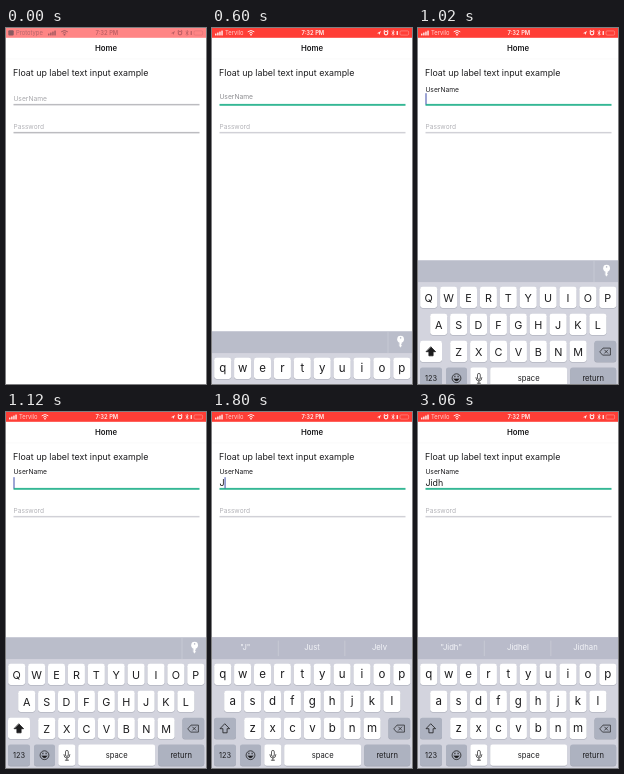
An HTML page that plays this animation: 200x356 px, repeating every 3.16 s.

```html
<!DOCTYPE html>
<html lang="en">
<head>
<meta charset="utf-8">
<title>Float up label</title>
<style>
  html, body { margin: 0; width: 100%; height: 100%; overflow: hidden; background: #fff; }
  svg { display: block; width: 100%; height: 100%; }
  text { font-family: Inter, "Liberation Sans", sans-serif; white-space: pre; }
</style>
</head>
<body>
<svg id="stage" viewBox="0 0 200 356" xmlns="http://www.w3.org/2000/svg"></svg>
<script>
const LOOP = 3160;
const NS = 'http://www.w3.org/2000/svg';
const stage = document.getElementById('stage');

const CUTS = [0, 100, 200, 300, 500, 600, 920, 1020, 1120, 1220, 1310, 1400, 1500,
  1700, 1800, 1970, 2070, 2170, 2290, 2390, 2490, 2760, 2860, 2960, 3060];

function el(tag, attrs, parent = stage) {
  const node = document.createElementNS(NS, tag);
  set(node, attrs);
  parent.appendChild(node);
  return node;
}
function set(node, attrs) {
  for (const k in attrs) node.setAttribute(k, attrs[k]);
}
function text(str, x, y, size, attrs = {}, parent = stage) {
  const node = el('text', { x, y, 'font-size': size, fill: '#1c1c1e', ...attrs }, parent);
  node.textContent = str;
  return node;
}
function rect(x, y, width, height, fill, parent = stage, rx = 0) {
  return el('rect', { x, y, width, height, fill, rx }, parent);
}
function path(d, parent, attrs = {}) {
  return el('path', { d, fill: 'none', stroke: '#1c1c1e', 'stroke-width': 0.8, 'stroke-linecap': 'round',
    'stroke-linejoin': 'round', ...attrs }, parent);
}
const group = (parent = stage) => el('g', {}, parent);
const show = (node, on) => set(node, { visibility: on ? 'inherit' : 'hidden' });
const mid = { 'text-anchor': 'middle' };

// Linear track through [time, value] points.
function track(points, t) {
  let [t0, v0] = points[0];
  for (const [t1, v1] of points) {
    if (t < t1) return v0 + (v1 - v0) * Math.max(0, (t - t0) / (t1 - t0));
    [t0, v0] = [t1, v1];
  }
  return v0;
}
// Value of the last [time, value] entry already reached.
const step = (points, t) => points.filter(p => p[0] <= t).pop()[1];
const mix = (a, b, k) => `rgb(${a.map((v, i) => Math.round(v + (b[i] - v) * k))})`;

// Status bar
const statusBg = rect(0, 0, 200, 9.8, '#ff443c');

function signal(x, parent, fill) {
  for (let i = 0; i < 4; i++) rect(x + i * 2.1, 5.6 - i, 1.5, 1.8 + i, fill, parent, 0.3);
}
function wifi(x, parent, color) {
  for (const r of [1.5, 3]) {
    path(`M${x - r} ${6.6 - r}Q${x} ${5.2 - r * 1.35} ${x + r} ${6.6 - r}`, parent, { stroke: color, 'stroke-width': 1 });
  }
  el('circle', { cx: x, cy: 6.7, r: 0.9, fill: color }, parent);
}

const oldStatus = group();
rect(2.3, 2.2, 5.4, 5.4, '#8a5a60', oldStatus, 1);
text('Prototype', 10, 7.1, 5.8, { fill: '#b5656a' }, oldStatus);
signal(42, oldStatus, '#a55a60');
wifi(58.5, oldStatus, '#a55a60');

const newStatus = group();
signal(3, newStatus, '#ffe4e2');
text('Tervilo', 13, 7.1, 5.8, { fill: '#ffd0cd' }, newStatus);
wifi(39, newStatus, '#ffe4e2');

const clock = text('7:32 PM', 100.8, 7.1, 5.8, { ...mid, 'font-weight': 600 });
const icons = group();
path('M165 5.2L169 3L167.3 7.1L166.9 5.4Z', icons, { fill: 'currentColor', stroke: 'none' });
el('circle', { cx: 174, cy: 5.1, r: 1.8, fill: 'none', stroke: 'currentColor', 'stroke-width': 1.1 }, icons);
path('M171.8 3L172.7 2.3M176.2 3L175.3 2.3', icons, { stroke: 'currentColor' });
path('M179.9 3.7L182.3 6.1L181.1 7.3V2.5L182.3 3.7L179.9 6.1', icons, { stroke: 'currentColor', 'stroke-width': 0.7 });
rect(184.6, 3, 1.3, 4, 'currentColor', icons, 0.3);
el('rect', { x: 188, y: 2.9, width: 8.6, height: 4.2, rx: 1, fill: 'none', stroke: 'currentColor',
  'stroke-width': 0.6, opacity: 0.5 }, icons);

// Page
text('Home', 100, 23.2, 7.8, { ...mid, 'font-weight': 600 });
rect(0, 30.7, 200, 0.5, '#f5f5f5');
text('Float up label text input example', 7.1, 47.5, 8.85);
const userLabel = text('UserName', 7.4, 0, 6.7);
text('Password', 7.5, 101.4, 6.6, { fill: '#b2b2b7' });
const userLine = rect(7.5, 75.9, 186, 1.5, '#bcbcc0');
const passLine = rect(7.5, 103.9, 186, 1.5, '#bcbcc0');
const value = text('', 7.4, 73.7, 8.85);
const caret = rect(0, 65.2, 1, 11.2, '#3f4cab');

// Keyboard
const kb = group();
rect(0, 225.8, 200, 132, '#d3d4de', kb);
rect(0, 225.8, 200, 21.7, '#babdca', kb);

const keyBar = group(kb);
rect(175.7, 226, 0.6, 21.5, '#cdd0d9', keyBar);
el('circle', { cx: 188.6, cy: 233.6, r: 3.4, fill: '#fff' }, keyBar);
el('circle', { cx: 188.6, cy: 232.3, r: 0.8, fill: '#babdca' }, keyBar);
path('M187.6 236H189.6V238L188.9 238.8L189.6 239.6L188.6 241.6L187.6 240.6Z', keyBar, { fill: '#fff', stroke: '#fff', 'stroke-width': 0.4 });

const hints = group(kb);
rect(0, 225.8, 200, 21.7, '#b9bbca', hints);
for (const x of [65.9, 132.6]) rect(x, 229, 0.6, 15.5, '#cfd2da', hints);
const hintTexts = [33.3, 100, 167.5].map(x => text('', x, 238.8, 7.7, { ...mid, fill: '#f3f4f8' }, hints));

function key(x, y, w, fill = '#fff') {
  rect(x, y - 10.2, w, 21.2, '#a3a6b2', kb, 2.4);
  return rect(x, y - 10.8, w, 21.2, fill, kb, 2.4);
}

const GRAY = '#adb2c0';
const keys = {};
[['qwertyuiop', 10.7, 263], ['asdfghjkl', 20.7, 290], ['zxcvbnm', 40.7, 317]].forEach(([row, x0, y]) => {
  [...row].forEach((ch, i) => {
    const x = x0 + i * 19.9;
    key(x - 8.5, y, 17);
    keys[ch] = { x, y, label: text(ch, x, y + 4, 11.4, mid, kb) };
  });
});

const shiftKey = key(2, 317, 22, GRAY);
const shiftIcon = path('M13 312.4L17.6 317.1H15.1V321.2H10.9V317.1H8.4Z', kb);
key(176.4, 317, 21.8, GRAY);
path('M182 317L185 313.5H192.4V320.5H185Z M186.6 315.4L189.8 318.6M189.8 315.4L186.6 318.6', kb, { 'stroke-width': 0.7 });

key(2, 343.8, 22, GRAY);
text('123', 13, 346.5, 7.4, mid, kb);
key(28, 343.8, 21, GRAY);
el('circle', { cx: 38.5, cy: 343.6, r: 4.4, fill: 'none', stroke: '#1c1c1e', 'stroke-width': 0.8 }, kb);
path('M35.9 344.4Q38.5 348.6 41.1 344.4Z', kb, { fill: '#1c1c1e', 'stroke-width': 0.4 });
path('M36.9 341.5V342.3M40.1 341.5V342.3', kb, { 'stroke-width': 1 });
key(52.3, 343.8, 17);
el('rect', { x: 59.5, y: 338.8, width: 2.8, height: 6, rx: 1.4, fill: 'none', stroke: '#1c1c1e', 'stroke-width': 0.7 }, kb);
path('M57.9 343Q57.9 346.4 60.9 346.4T63.9 343M60.9 346.4V348.6M59.3 348.6H62.5', kb, { 'stroke-width': 0.7 });
key(72.2, 343.8, 77);
text('space', 110.7, 346.1, 7.6, mid, kb);
key(152.2, 343.8, 46, GRAY);
text('return', 175.2, 346.1, 7.6, mid, kb);

const popup = group(kb);
path('M-11-41.7H11Q15-41.7 15-37.7V-21C15-15 8.6-15 8.6-9V8Q8.6 10.4 6 10.4H-6Q-8.6 10.4-8.6 8V-9C-8.6-15-15-15-15-21V-37.7Q-15-41.7-11-41.7Z',
  popup, { fill: '#fff', stroke: '#c2c5d0', 'stroke-width': 0.6 });
const popupText = text('', 0, -22.5, 17, mid, popup);

const TYPED = [[0, ''], [1700, 'J'], [1970, 'Ji'], [2170, 'Jid'], [2290, 'Jidh']];
const PRESSED = [[0, ''], [1700, 'j'], [1800, ''], [1970, 'i'], [2070, ''], [2170, 'd'], [2290, 'h'], [2490, '']];
const HINTS = [[0, ['', '', '']], [1800, ['"J"', 'Just', 'Jelv']], [2760, ['"Jidh"', 'Jidhel', 'Jidhan']]];
const LABEL_Y = [[500, 73.4], [600, 70.5], [920, 66.6], [1020, 63.5], [1120, 61.6]];
const SLIDE = [[300, 130], [500, 112], [600, 78], [920, 21.7], [1020, 7], [1120, 0]];
const CARET = [[0, 0], [919, 0], [920, 1], [1220, 1], [1500, 0], [1699, 0], [1700, 1], [2760, 1], [3060, 0]];

function draw(time) {
  const t = CUTS.filter(c => c <= time).pop();

  const fade = track([[0, 0], [300, 1]], t);
  const ink = mix([190, 95, 100], [255, 240, 238], fade);
  set(statusBg, { fill: mix([255, 133, 133], [255, 62, 54], fade) });
  set(oldStatus, { opacity: 1 - fade });
  set(newStatus, { opacity: fade });
  set(clock, { fill: ink });
  set(icons, { color: ink });

  const rise = track([[500, 0], [1120, 1]], t);
  set(userLabel, { y: track(LABEL_Y, t), fill: mix([168, 168, 172], [25, 25, 28], Math.min(1, rise * 1.15)) });
  const focused = t >= 600;
  set(userLine, {
    fill: focused ? '#35b795' : t >= 500 ? '#78bda9' : '#bcbcc0',
    height: focused ? 1.9 : 1.5
  });
  set(passLine, { fill: focused ? '#d1d1d7' : '#bcbcc0' });

  const typed = step(TYPED, t);
  value.textContent = typed;
  set(caret, {
    x: 7.5 + value.getComputedTextLength(),
    opacity: track(CARET, t)
  });

  show(kb, t >= 500);
  set(kb, { transform: `translate(0 ${track(SLIDE, t) - 0.4})` });
  const caps = t >= 920 && t < 1800;
  for (const ch in keys) {
    const { label, y } = keys[ch];
    label.textContent = caps ? ch.toUpperCase() : ch;
    set(label, { y: y + (caps ? 4 : 3.4), 'font-size': caps ? 10.8 : 11.5 });
  }
  set(shiftKey, { fill: caps ? '#fff' : GRAY });
  set(shiftIcon, { fill: caps ? '#1c1c1e' : 'none' });

  const words = step(HINTS, t);
  show(keyBar, !words[0]);
  show(hints, words[0]);
  hintTexts.forEach((node, i) => node.textContent = words[i]);

  const pressed = step(PRESSED, t);
  show(popup, pressed);
  if (pressed) {
    const { x, y } = keys[pressed];
    set(popup, { transform: `translate(${x} ${y})` });
    popupText.textContent = caps ? pressed.toUpperCase() : pressed;
  }
}

const start = performance.now();
function tick() {
  draw((performance.now() - start) % LOOP);
  requestAnimationFrame(tick);
}
tick();
</script>
</body>
</html>
```
